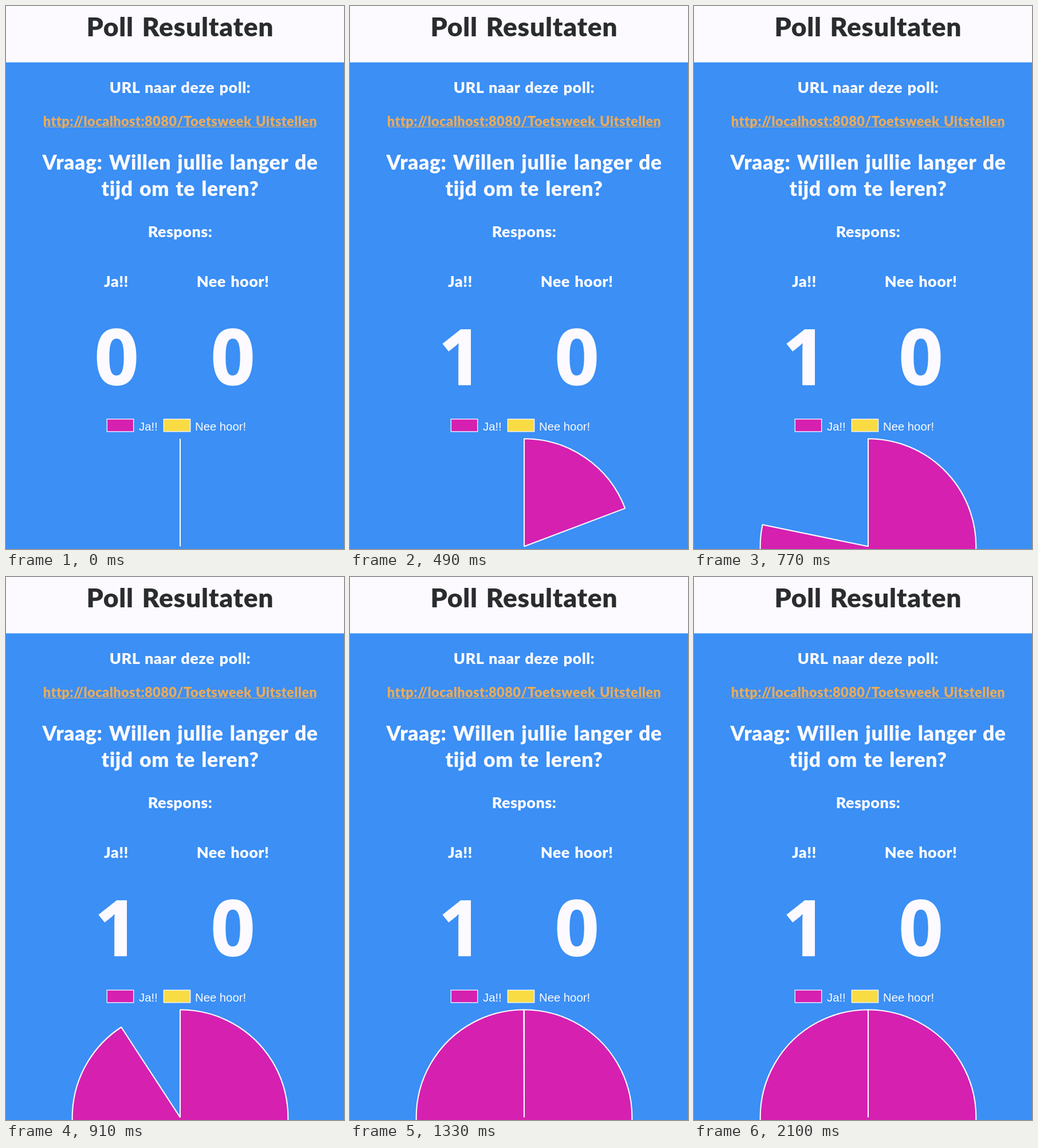
Animation, 590 px wide and 949 px high, one loop 2170 ms. Source, as an HTML page:

```html
<!DOCTYPE html>
<html lang="nl">
<head>
<meta charset="utf-8">
<title>Poll Resultaten</title>
<style>
  html, body { margin: 0; width: 100%; height: 100%; overflow: hidden; background: #3b8ff5; }
  svg { display: block; }
  text { font: 900 27px Lato, sans-serif; letter-spacing: .016em; word-spacing: .07em; fill: #fcfaff; }
  .mid { text-anchor: middle; }
  #title { font-size: 46.2px; fill: #2a2c2e; }
  #link { font-size: 23.6px; fill: #e8ab5c; }
  .question { font-size: 35.5px; }
  .count { font: 700 135px "Open Sans", sans-serif; letter-spacing: 0; stroke: #fcfaff; stroke-width: 1.5; }
  .legend { font: 20.3px "Liberation Sans", Arial, sans-serif; letter-spacing: 0; word-spacing: 0; }
  .key { stroke: #fcfaff; stroke-width: 1.3; }
  #slice { fill: #d620b0; stroke: #fcfaff; stroke-width: 2.1; stroke-linejoin: bevel; }
</style>
</head>
<body>
<svg width="590" height="949" viewBox="0 0 590 949">
  <rect width="590" height="98.5" fill="#fcfaff"/>
  <g class="mid">
    <text id="title" x="304" y="53">Poll Resultaten</text>
    <text x="304" y="152">URL naar deze poll:</text>
    <text id="link" x="304" y="210">http://localhost:8080/Toetsweek Uitstellen</text>
    <text class="question" x="304" y="286">Vraag: Willen jullie langer de</text>
    <text class="question" x="304" y="332">tijd om te leren?</text>
    <text x="304" y="404">Respons:</text>
    <text x="192.5" y="491">Ja!!</text>
    <text x="396" y="491">Nee hoor!</text>
    <text class="count" id="yes" x="193" y="662">0</text>
    <text class="count" x="396" y="662">0</text>
  </g>
  <path d="M67 211.5H541" stroke="#e8ab5c" stroke-width="1.2"/>
  <rect class="key" x="176.3" y="722" width="46.4" height="21.8" fill="#d620b0"/>
  <rect class="key" x="275.3" y="722" width="46.4" height="21.8" fill="#f9dc44"/>
  <text class="legend" x="232" y="742">Ja!!</text>
  <text class="legend" x="330" y="742">Nee hoor!</text>
  <path id="slice"/>
</svg>
<script>
  const LOOP = 2170, STEP = 70, VOTE = 420, GROW = 435, GROW_TIME = 1057;
  const CX = 304, CY = 944.5, R = 188.3;
  const yes = document.getElementById('yes');
  const slice = document.getElementById('slice');
  const easeOutQuart = p => 1 - (1 - p) ** 4;

  function draw() {
    const now = performance.now() % LOOP;
    const t = Math.floor(now / STEP) * STEP;
    const p = Math.min(1, Math.max(0, (t - GROW) / GROW_TIME));
    const angle = easeOutQuart(p) * (2 * Math.PI - 1e-4);
    const x = CX + R * Math.sin(angle), y = CY - R * Math.cos(angle);
    const large = angle > Math.PI ? 1 : 0;
    yes.textContent = t < VOTE ? 0 : 1;
    slice.setAttribute('d', `M${CX} ${CY}V${CY - R}A${R} ${R} 0 ${large} 1 ${x} ${y}Z`);
    requestAnimationFrame(draw);
  }
  draw();
</script>
</body>
</html>
```
